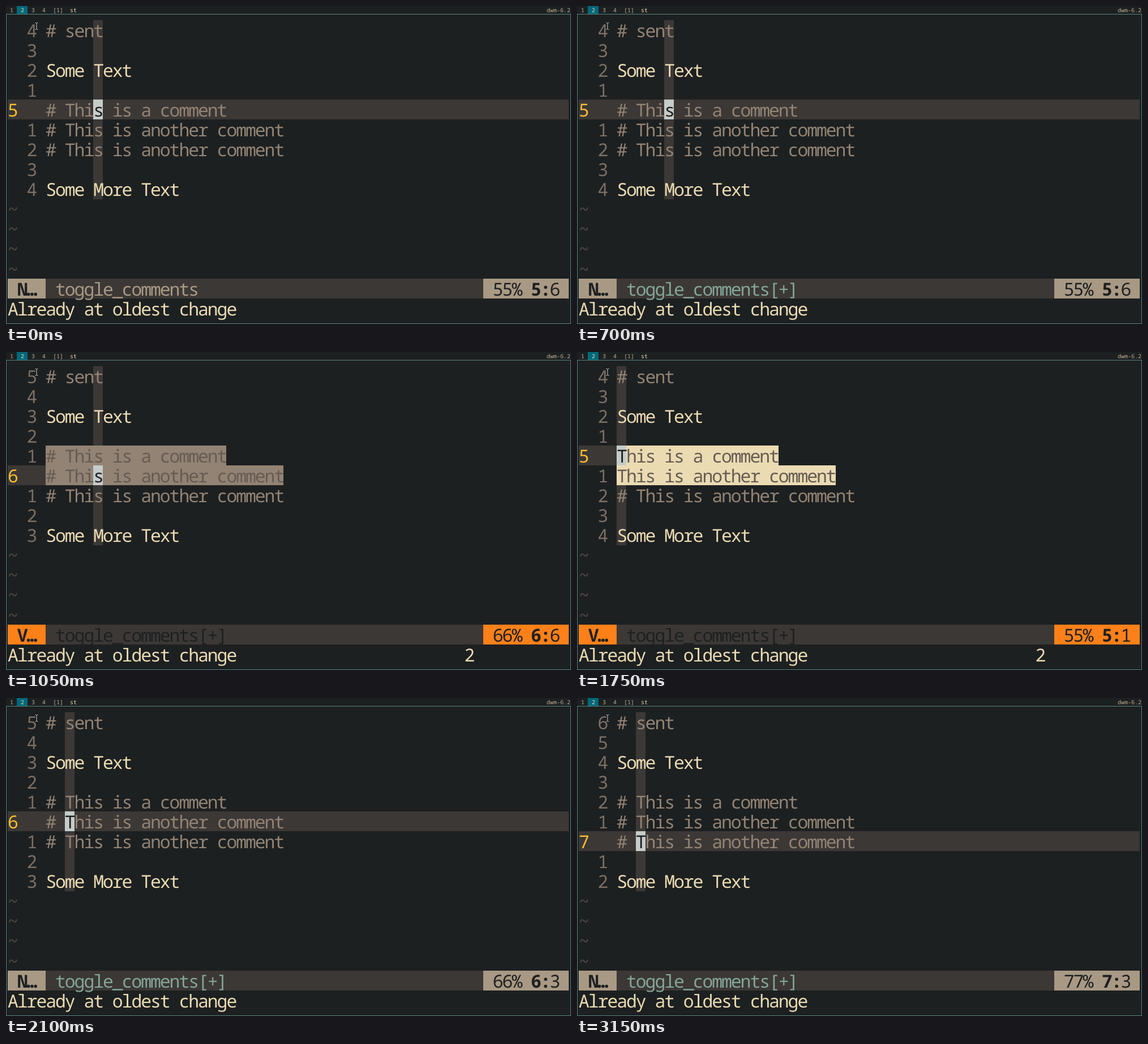
An HTML page for the animation above (3.5 s loop, 998 by 561 pixels).

```html
<!DOCTYPE html>
<html lang="en">
<head>
<meta charset="utf-8">
<title>Toggling comments</title>
<style>
  html, body { margin: 0; width: 100%; height: 100%; overflow: hidden; background: #1d2021; }
  svg { display: block; }
  rect { shape-rendering: crispEdges; }
  text {
    font-family: "Noto Sans Mono", "DejaVu Sans Mono", monospace;
    white-space: pre;
    text-rendering: geometricPrecision;
  }
  #term text { font-size: 31.5px; letter-spacing: -2.1px; }
  #bar text { font-size: 10px; }
  .b { font-weight: 700; }
</style>
</head>
<body>
<svg width="998" height="561" viewBox="0 0 998 561">
  <g id="bar" fill="#bdae93">
    <rect x="19" width="19" height="14" fill="#00687a"/>
    <text x="7" y="11">1</text>
    <text x="26" y="11" fill="#ebdbb2">2</text>
    <text x="45" y="11">3</text>
    <text x="64" y="11">4</text>
    <text x="83" y="11">[1]</text>
    <text x="113" y="11" fill="#ebdbb2">st</text>
    <text x="955" y="11">dwm-6.2</text>
  </g>
  <rect x=".5" y="14.5" width="997" height="546" fill="none" stroke="#568783"/>
  <g id="term"></g>
  <g fill="none">
    <path d="M51 29.5h2l1 1 1-1h2M54 30v11M51 41.5h2l1-1 1 1h2" stroke="#111" stroke-width="2.5"/>
    <path d="M51.5 29.5h1.5l1 1 1-1h1.500M54 30v11M51.500 41.5h1.500l1-1 1 1h1.500" stroke="#ddd"/>
  </g>
</svg>
<script>
const CELL = 16.8, ROW = 35.07, LEFT = 3, TOP = 25, COLS = 59, GUTTER = 4;
const LOOP = 3500;
const C = {
  bg: '#1d2021', line: '#3c3836', tilde: '#504945', dim: '#665c54', number: '#7c6f64',
  comment: '#928374', status: '#a89984', text: '#ebdbb2', yellow: '#fabd2f',
  teal: '#83a598', orange: '#fe8019', cursor: '#c5ccc9'
};
const LINES = ['# sent', '', 'Some Text', '', '# This is a comment',
  '# This is another comment', '# This is another comment', '', 'Some More Text'];
const SELECTED = [5, 6];

// Each step: start time, cursor line, cursor column, uncommented lines, visual mode, modified
const STEPS = [
  [0, 5, 6, [], false, false],
  [350, 5, 4, [5], false, true],
  [700, 5, 6, [], false, true],
  [1050, 6, 6, [], true, true],
  [1400, 6, 1, [5, 6], false, true],
  [1750, 5, 1, [5, 6], true, true],
  [2100, 6, 3, [], false, true],
  [2800, 7, 1, [7], false, true],
  [3150, 7, 3, [], false, true]
];

const box = (col, row, w, h, fill) => {
  const x = Math.round(LEFT + col * CELL), y = Math.round(TOP + row * ROW);
  const right = Math.round(LEFT + (col + w) * CELL), bottom = Math.round(TOP + (row + h) * ROW);
  return `<rect x="${x}" y="${y}" width="${right - x}" height="${bottom - y}" fill="${fill}"/>`;
};

const label = (col, row, str, fill, cls = '') =>
  `<text x="${LEFT + col * CELL}" y="${TOP + row * ROW + 29.7}" fill="${fill}" class="${cls}">${str}</text>`;

function buffer(line, col, bare, visual) {
  let back = box(GUTTER + col - 1, 0, 1, LINES.length, C.line);
  back += box(0, line - 1, visual ? GUTTER : COLS, 1, C.line);
  let front = '';
  LINES.forEach((src, row) => {
    const n = row + 1, current = n === line;
    const str = bare.includes(n) ? src.slice(2) : src;
    const color = str[0] === '#' ? C.comment : C.text;
    const picked = visual && SELECTED.includes(n);
    if (picked) back += box(GUTTER, row, str.length, 1, color);
    front += current ? label(0, row, n, C.yellow) : label(2, row, Math.abs(n - line), C.number);
    const shown = current
      ? `${str.slice(0, col - 1)}<tspan fill="${C.bg}">${str[col - 1]}</tspan>${str.slice(col)}`
      : str;
    front += label(GUTTER, row, shown, picked ? C.dim : color);
  });
  back += box(GUTTER + col - 1, line - 1, 1, 1, C.cursor);
  for (let row = 9; row < 13; row++) front += label(0, row, '~', C.tilde);
  return back + front;
}

function statusLine(line, col, visual, modified) {
  const accent = visual ? C.orange : C.status;
  const nameColor = visual ? C.bg : modified ? C.teal : C.status;
  const percent = Math.floor(100 * line / LINES.length);
  return box(0, 13, COLS, 1, C.line) + box(0, 13, 4, 1, accent) + box(50, 13, 9, 1, accent) +
    label(1, 13, visual ? 'V…' : 'N…', C.bg, 'b') +
    label(5, 13, 'toggle_comments' + (modified ? '[+]' : ''), nameColor) +
    label(51, 13, percent + '%', C.bg) +
    label(55, 13, line + ':', C.bg, 'b') + label(57, 13, col, C.bg) +
    label(0, 14, 'Already at oldest change', C.text) +
    (visual ? label(48, 14, SELECTED.length, C.text) : '');
}

const term = document.getElementById('term');
let shownStep;

function draw(now) {
  const t = now % LOOP;
  const step = STEPS.findLast(s => s[0] <= t);
  if (step !== shownStep) {
    shownStep = step;
    const [, line, col, bare, visual, modified] = step;
    term.innerHTML = buffer(line, col, bare, visual) + statusLine(line, col, visual, modified);
  }
  requestAnimationFrame(draw);
}
draw(0);
</script>
</body>
</html>
```
